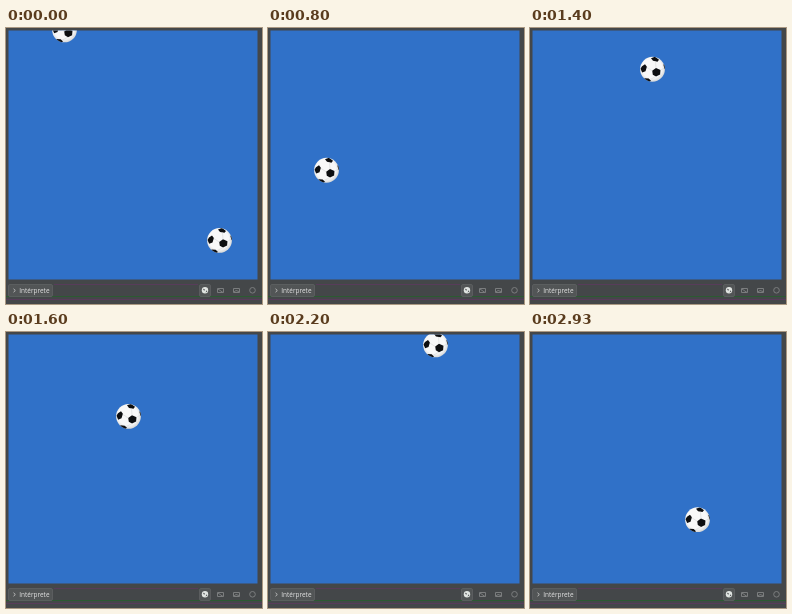
Recreate the animation shown at these times as an HTML page. Size 256 by 276 pixels, loop 3 s.

```html
<!DOCTYPE html>
<html lang="es">
<head>
<meta charset="utf-8">
<title>Falling balls</title>
<style>
html, body { margin: 0; width: 100%; height: 100%; overflow: hidden; background: #444749; }
svg { display: block; }
text { font: 500 6.45px "Open Sans", "Noto Sans", sans-serif; fill: #e4e4e4; }
.icon { fill: none; stroke: #7b7d7e; stroke-width: 1; }
.button { fill: #525556; stroke: #606364; stroke-width: .8; }
</style>
</head>
<body>
<svg width="256" height="276" viewBox="0 0 256 276">
  <defs>
    <clipPath id="field"><rect x="2.5" y="2.5" width="249" height="249"/></clipPath>
    <clipPath id="round"><circle r="12.4"/></clipPath>
    <radialGradient id="shade" cx=".47" cy=".45" r=".58">
      <stop offset=".7" stop-color="#f8f8f8"/>
      <stop offset="1" stop-color="#cfd1d2"/>
    </radialGradient>
    <g id="ball">
      <circle r="12.4" fill="url(#shade)"/>
      <g clip-path="url(#round)">
        <path d="M-.3 1.6L3.5-1.2L8 .8L7.6 5.2L3.5 7.2L.3 5.4Z
                 M-1.5-11L2.5-12.5L6.5-9.5L5-7.6L.5-8.4Z
                 M-10.5-3L-7.5-5L-5.6-2.5L-7 2L-10.3 3.3L-12-.5Z
                 M-8 9L-3.8 9.3L-1.5 11.5L-4 13.5L-9 12Z
                 M10.8-5L13-4V1L11.8-1Z" fill="#0d0e10"/>
        <path d="M3.5-1.2L3-8M-.3 1.6L-5.7-2M3.5 7.2L-2 10M8 .8L11.8-1M7.6 5.2L10 7.5"
              fill="none" stroke="#d0d2d3" stroke-width=".5"/>
      </g>
    </g>
  </defs>

  <rect width="256" height="276" fill="#444749"/>
  <rect x="2.5" y="2.5" width="249" height="249" fill="#3071c8"/>
  <g id="balls" clip-path="url(#field)"></g>

  <path d="M48 256.5H192M0 271.5H256" stroke="#583c5a"/>
  <path d="M0 268.5H256" stroke="#2c5a32"/>

  <rect class="button" x="2.5" y="256.5" width="44" height="12" rx="1.5"/>
  <path d="M7.5 260.8L9.3 262.5L7.5 264.2" fill="none" stroke="#d4d4d4" stroke-width=".8"/>
  <text x="13.3" y="265">Intérprete</text>

  <rect class="button" x="193.5" y="256.5" width="11" height="12" rx="1.5"/>
  <circle cx="199" cy="262.3" r="3.2" fill="#e0e4e1"/>
  <path d="M197 260.8L198.8 261.2L198.2 263ZM199.5 264.5L200.8 262.2L201.3 263.5Z" fill="#3f4244"/>
  <g class="icon">
    <path d="M211.5 260.5H217.5V264.5H211.5ZM212 261L217 264.5"/>
    <path d="M227.5 260.5H233.5V264.5H227.5ZM228 264L230 262.5L233 263.5"/>
    <circle cx="246.5" cy="262.3" r="2.8"/>
  </g>
</svg>
<script>
// Drops: x position and start, in steps of 1/15 s
const drops = [[213.5, -15.57], [58.5, -.72], [122.5, 14.24], [167.5, 29.37]];
const layer = document.getElementById("balls");
const balls = drops.map(() => {
  const ball = document.createElementNS("http://www.w3.org/2000/svg", "use");
  ball.setAttribute("href", "#ball");
  return layer.appendChild(ball);
});

function stepAt(time) {
  const rest = time % 200;
  return 3 * Math.floor(time / 200) + (rest >= 70) + (rest >= 130);
}

function draw() {
  const step = stepAt(performance.now() % 3000);
  drops.forEach(([x, start], i) => {
    const age = step - start;
    const y = age < 0 ? -50 : 1.5 + .87 * age * age;
    balls[i].setAttribute("transform", `translate(${x} ${y})`);
  });
  requestAnimationFrame(draw);
}
draw();
</script>
</body>
</html>
```
